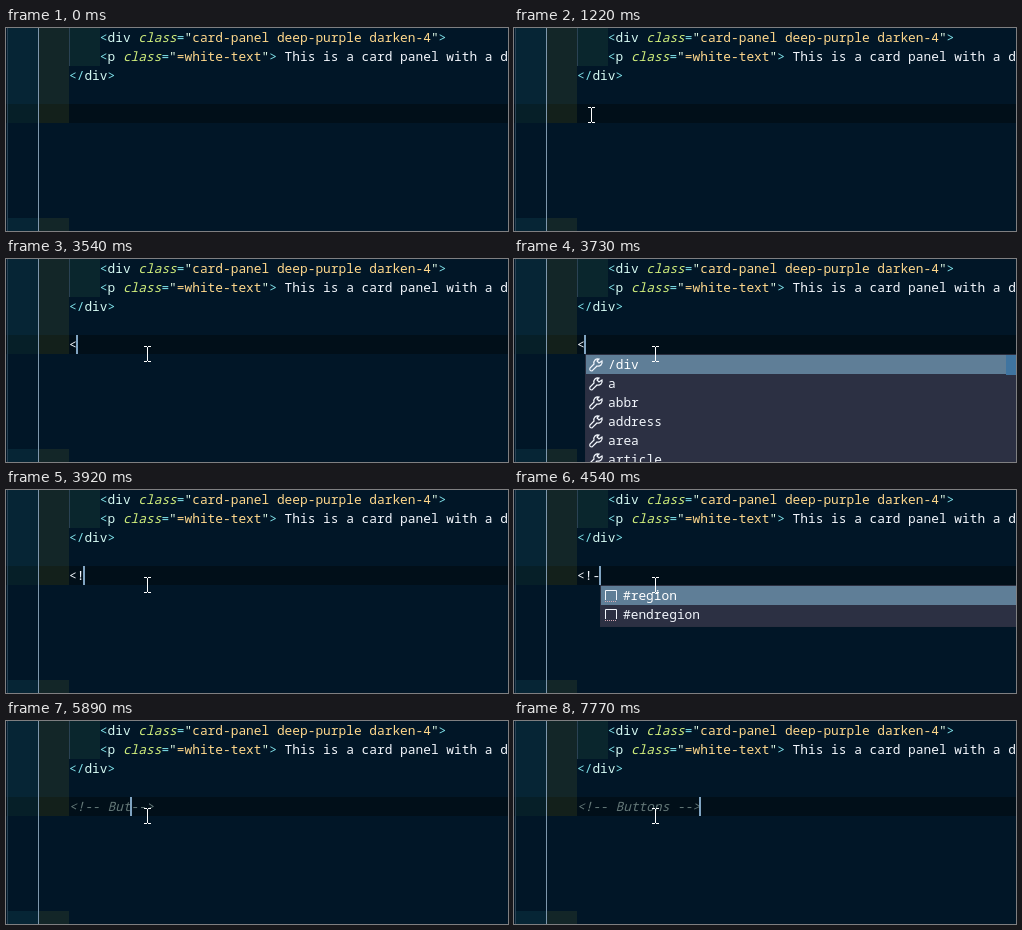
These frames come from a looping animation (502x203 px, 8 s). An HTML page with a canvas:

```html
<!DOCTYPE html>
<html lang="en">
<head>
<meta charset="utf-8">
<style>
html, body { margin: 0; width: 100%; height: 100%; overflow: hidden; background: #011627; }
canvas { display: block; }
</style>
</head>
<body>
<canvas id="stage" width="502" height="203"></canvas>
<script>
const ctx = document.getElementById('stage').getContext('2d');
const LOOP = 8000, CHAR = 7.7, LINE = 19, LEFT = 63;
const PLAIN = '#f2f6fc', PUNCT = '#80e2ea', TAG = '#d6faf4', ATTR = '#d0ee7c',
      STRING = '#ffd88c', QUOTE = '#e6ffea', COMMENT = '#637777';

const openTag = (name, value) => [
  ['<', PUNCT], [name, TAG], [' ', PLAIN], ['class', ATTR, true], ['=', PUNCT],
  ['"', QUOTE], [value, STRING], ['"', QUOTE], ['>', PUNCT]
];
const code = [
  [4, openTag('div', 'card-panel deep-purple darken-4')],
  [4, [...openTag('p', '=white-text'), [' This is a card panel with a d', PLAIN]]],
  [0, [['</', PUNCT], ['div', TAG], ['>', PUNCT]]]
];

// Pointer: time, x, y
const pointerPath = [
  [330, 381, 199], [830, 56, 86], [1030, 56, 86], [1220, 77, 87], [1550, 77, 87],
  [1600, 80, 83], [1650, 83, 89], [1810, 83, 89], [2100, 141, 94], [2530, 141, 94], [2600, 141, 95]
];

// Typing: time, text before the caret, text after it
const edits = [
  [0, '', ''], [3540, '<', ''], [3920, '<!', ''], [4400, '<!-', ''], [4670, '<!--', '-->'],
  ...[4870, 5270, 5490, 5890, 6040, 6170, 6370, 6500, 6800]
    .map((time, i) => [time, '<!--' + ' Buttons '.slice(0, i + 1), '-->']),
  [7160, '<!-- Buttons -', '->'], [7510, '<!-- Buttons --', '>'], [7770, '<!-- Buttons -->', '']
];

function rect(color, x, y, w, h) {
  ctx.fillStyle = color;
  ctx.fillRect(x, y, w, h);
}

function write(text, x, baseline, color, italic) {
  ctx.font = (italic ? 'italic ' : '') + '500 12.83px "Noto Sans Mono", monospace';
  ctx.fillStyle = color;
  [...text].forEach((c, i) => ctx.fillText(c, x + i * CHAR, baseline));
}

function drawEditor() {
  rect('#011627', 0, 0, 502, 203);
  rect('#010f19', 0, 76, 502, LINE);
  for (const [y, h] of [[0, 95], [190, 13]]) {
    rect('rgba(79,236,236,.07)', 1, y, 31, h);
    rect('rgba(255,255,64,.07)', 32, y, 31, h);
  }
  rect('rgba(127,255,127,.07)', 63, 0, 31, 38);
  rect('#2a4254', 1, 0, 1, 203);
  rect('#7e97ac', 32, 0, 1, 203);
  rect('#2a4254', 63, 0, 1, 38);
  code.forEach(([indent, runs], row) => {
    let x = LEFT + indent * CHAR;
    for (const [text, color, italic] of runs) {
      write(text, x, row * LINE + 14, color, italic);
      x += text.length * CHAR;
    }
  });
}

function drawWrench(x, y) {
  ctx.lineWidth = 1.2;
  ctx.strokeStyle = PLAIN;
  ctx.stroke(new Path2D(`M${x + 10} ${y + 1}a4 4 0 0 0-5 5L${x + 1} ${y + 10}q-1 3 2 3l5-5a4 4 0 0 0 5-5l-3 2-2-2z`));
}

function drawSnippet(x, y) {
  ctx.lineWidth = 1;
  ctx.strokeStyle = PLAIN;
  ctx.stroke(new Path2D(`M${x + 1.5} ${y + 11}v-9.5h11v9.5`));
  for (let i = 1; i < 13; i += 2) rect('#d5a9b4', x + i, y + 12, 1, 1);
}

function drawPopup(x, height, items, drawIcon) {
  rect('#2b2f40', x, 95, 502 - x, height);
  rect('#2c3043', x + 1, 96, 501 - x, height - 2);
  rect('#5f7e97', x + 1, 96, 501 - x, LINE);
  items.forEach((item, i) => {
    const y = 96 + i * LINE;
    drawIcon(x + 4, y + 3);
    write(item, x + 23, y + 14, i ? PLAIN : '#fff');
  });
}

function drawPointer(t) {
  if (t < pointerPath[0][0]) return;
  const next = pointerPath.findIndex(p => p[0] > t);
  const b = pointerPath.at(next);
  const a = next < 0 ? b : pointerPath[next - 1];
  const k = a === b ? 0 : (t - a[0]) / (b[0] - a[0]);
  // The first sweep curves: x settles sooner than y
  const [powerX, powerY] = next === 1 ? [3.2, 1.6] : [1, 1];
  const x = Math.round(b[1] + (a[1] - b[1]) * (1 - k) ** powerX);
  const y = Math.round(b[2] + (a[2] - b[2]) * (1 - k) ** powerY);
  rect('#fff', x, y - 7, 1, 14);
  for (const edge of [y - 8, y + 7]) {
    rect('#fff', x - 3, edge, 3, 1);
    rect('#fff', x + 1, edge, 3, 1);
  }
}

function draw(now) {
  const t = now % LOOP;
  const [, before, after] = edits.findLast(e => e[0] <= t);
  drawEditor();
  const isComment = before.startsWith('<!--');
  write(before + after, LEFT, 90, isComment ? COMMENT : PLAIN, isComment);
  const caretX = Math.round(LEFT - 1.1 + before.length * CHAR);
  if (t >= 3540 || (t >= 1600 && t < 2100) || (t >= 2600 && t < 3080)) {
    rect('#80a4c2', caretX, 76, 2, LINE);
  }
  if (t >= 3660 && t < 3920) {
    drawPopup(71, 120, ['/div', 'a', 'abbr', 'address', 'area', 'article'], drawWrench);
    rect('#3f74a0', 492, 96, 10, 20);
  }
  if (t >= 4480 && t < 4670) drawPopup(86, 42, ['#region', '#endregion'], drawSnippet);
  drawPointer(t);
}

const start = performance.now();
function frame() {
  draw(performance.now() - start);
  requestAnimationFrame(frame);
}
frame();
</script>
</body>
</html>
```
